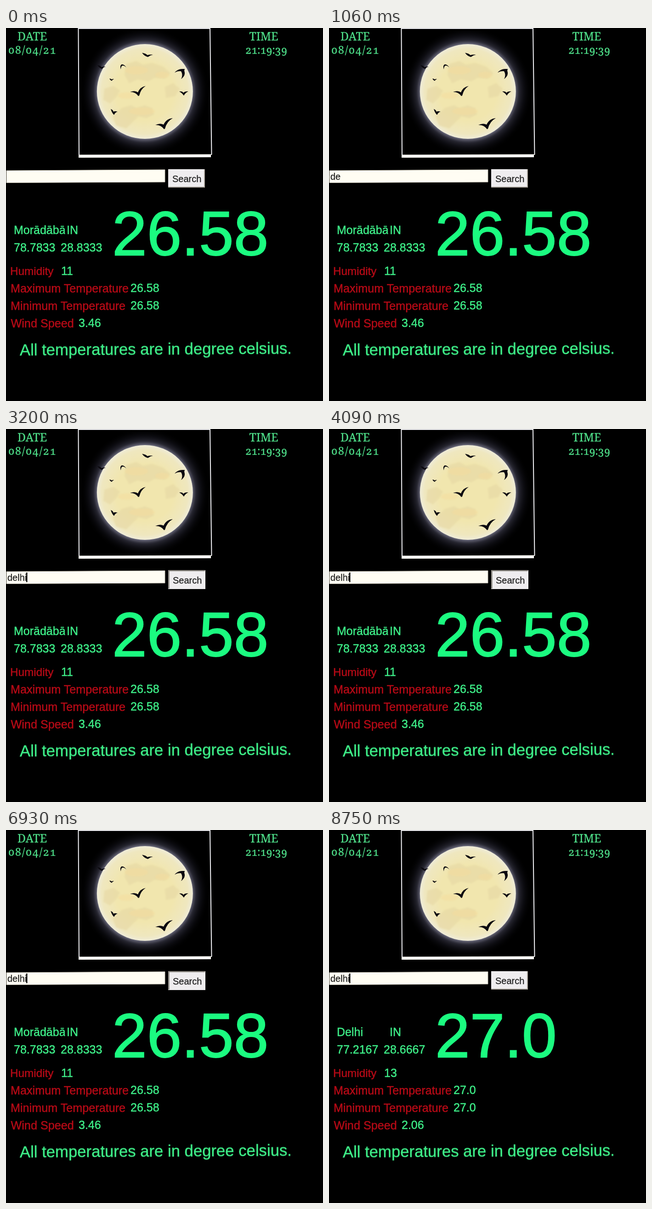
Write an HTML page that moves like this. It is 690 px wide and 811 px high and loops after 8920 ms.

```html
<!DOCTYPE html>
<html lang="en">
<head>
<meta charset="utf-8">
<title>Weather</title>
<style>
html, body { margin: 0; width: 100%; height: 100%; overflow: hidden; background: #000; }
svg { display: block; width: 690px; height: 811px; }
text { font-family: "Liberation Sans", Arial, sans-serif; white-space: pre; }
.serif text { font: 500 23px "Noto Serif", Georgia, serif; font-variant-numeric: oldstyle-nums; fill: #4fe08a; stroke: #4fe08a; stroke-width: .3px; }
.serif .head { font-size: 24.8px; }
.info { font-size: 25px; fill: #3eee88; stroke: #3eee88; stroke-width: .5px; }
.label { font-size: 25.2px; fill: #b50a16; stroke: #b50a16; }
.big { font-size: 136px; fill: #1bfb80; stroke: #1bfb80; stroke-width: 2px; }
.note { font-size: 34.7px; }
.field { font-size: 20px; fill: #222; stroke: #222; stroke-width: .3px; }

.before, .after, .up, .down, .typing, .caret { animation: 8.92s step-end infinite; }
.before { animation-name: before; }
.after { animation-name: after; }
.up { animation-name: up; }
.down { animation-name: down; }
.typing { animation-name: typing; }
.caret { animation-name: blink; }

@keyframes before { 0% { visibility: visible } 87.67%, 100% { visibility: hidden } }
@keyframes after { 0% { visibility: hidden } 87.67%, 100% { visibility: visible } }
@keyframes up { 0%, 87.67% { visibility: visible } 34.75% { visibility: hidden } 100% { visibility: visible } }
@keyframes down { 0%, 87.67% { visibility: hidden } 34.75% { visibility: visible } 100% { visibility: hidden } }
@keyframes typing {
  0% { transform: translateX(0) }
  7% { transform: translateX(11px) }
  10% { transform: translateX(22px) }
  13% { transform: translateX(27px) }
  15.5% { transform: translateX(38px) }
  18.5%, 100% { transform: translateX(42px) }
}
@keyframes blink {
  0%, 10.09%, 20.18%, 30.27% { visibility: hidden }
  3.36%, 13.45%, 23.54%, 33.63%, 100% { visibility: visible }
}
</style>
</head>
<body>
<svg viewBox="0 0 690 811">
  <defs>
    <radialGradient id="glow">
      <stop offset=".74" stop-color="#a9a8c4" stop-opacity=".6"/>
      <stop offset=".8" stop-color="#6c6b88" stop-opacity=".34"/>
      <stop offset=".88" stop-color="#3a3950" stop-opacity=".2"/>
      <stop offset="1" stop-color="#000" stop-opacity="0"/>
    </radialGradient>
    <radialGradient id="moon">
      <stop offset=".6" stop-color="#f1e6ae"/>
      <stop offset=".9" stop-color="#efe7bf"/>
      <stop offset="1" stop-color="#efecd8"/>
    </radialGradient>
    <filter id="soft"><feGaussianBlur stdDeviation="1.5"/></filter>
    <clipPath id="city"><path d="M0 415H128.5V460H0z"/></clipPath>
    <clipPath id="frame"><path d="M158 1H444L447 276H159z"/></clipPath>
  </defs>

  <g class="serif">
    <text class="head" x="25" y="27">DATE</text>
    <text x="5" y="56" letter-spacing="1.5">08/04/21</text>
    <text class="head" x="529.5" y="27">TIME</text>
    <text x="521" y="56" letter-spacing="-.3">21:19:39</text>
  </g>

  <g clip-path="url(#frame)">
    <circle cx="302" cy="138" r="140" fill="url(#glow)"/>
    <ellipse cx="302.3" cy="138" rx="104.5" ry="103" fill="url(#moon)"/>
    <g filter="url(#soft)" fill="#e6d8a4" opacity=".6">
      <path d="M262 78l22-6 14 8 20-4 24 8 16 14-12 12-22-2-14 8-24-4-18 8-10-18z"/>
      <path d="M252 174l20-6 12 6 18-6 16 6 4 14-16 8-18-4-12 12-14 14-22-6-8-20z"/>
      <path d="M214 132l20-6 14 10-8 14-14 14-14-8z"/>
      <path d="M346 128l18-8 14 12-10 16-20 4z"/>
    </g>
    <g filter="url(#soft)" fill="#f6dc9c" opacity=".45">
      <ellipse cx="284" cy="92" rx="25" ry="9"/>
      <ellipse cx="296" cy="181" rx="28" ry="8"/>
      <ellipse cx="262" cy="147" rx="18" ry="7"/>
      <ellipse cx="340" cy="102" rx="15" ry="7"/>
    </g>
    <g fill="#0c0a10">
      <path d="M296 54q8 1 12 5q5-2 12-1q-6 1-11 5q-7-1-13-9z"/>
      <path d="M199 81q6 0 9 4q4-2 9-1q-5 1-8 5q-6-2-10-8z"/>
      <path d="M250 90q-3-8 2-11q6 0 10 7q-5-5-9-4q-3 2-3 8z"/>
      <path d="M225 110q4 0 5 2q2-2 5-1q-3 1-5 4q-3-1-5-5z"/>
      <path d="M367 97q7-8 16-8l6 0l-1 4q4 10-7 18q5-9 0-17q-7-1-14 3z"/>
      <path d="M270 139q11-4 17 1q5-12 17-14q-11 7-14 21l-2 1q-6-9-18-9z"/>
      <path d="M377 138q7-1 9 3q4-4 11-3q-6 2-10 9q-4-6-10-9z"/>
      <path d="M228 176q5 2 6 6q3-2 9 0q-5 1-8 7q-5-5-7-13z"/>
      <path d="M325 211q10-5 18-1q6-13 20-14q-13 7-17 23l-2 1q-7-10-19-9z"/>
    </g>
  </g>
  <path d="M159 278L157.5 1H444L447.5 275" fill="none" stroke="#f4f4f8" stroke-width="2"/>
  <path d="M158 275.5L448 274.5V276L446 276V281L158 282z" fill="#fffef8"/>

  <path d="M1 310L346 308V335L1 336.5z" fill="#fffdf3" stroke="#b9b5a8"/>
  <text class="field" x="3" y="330">delhi</text>
  <g class="typing">
    <path d="M3 312H48V334H3z" fill="#fffdf3"/>
    <path class="caret" d="M2 312H4.5V333H2z" fill="#111"/>
  </g>

  <g class="up">
    <path d="M353 307H433V347H353z" fill="#efedef"/>
    <path d="M353 346H432V307" fill="none" stroke="#aaa49c" stroke-width="2"/>
    <text class="field" x="362" y="335">Search</text>
  </g>
  <g class="down">
    <path d="M353 307H434V348H353z" fill="#efedef"/>
    <path d="M354.5 347V308H433" fill="none" stroke="#8d8982" stroke-width="2.5"/>
    <text class="field" x="363" y="336">Search</text>
  </g>

  <g class="info">
    <text x="132" y="448">IN</text>
    <g class="label">
      <text x="9" y="537" font-size="24.3">Humidity</text>
      <text x="10" y="575">Maximum Temperature</text>
      <text x="10" y="613">Minimum Temperature</text>
      <text x="10.5" y="651">Wind Speed</text>
    </g>
    <g class="before">
      <text x="17" y="448" clip-path="url(#city)">Morādābād</text>
      <text x="17" y="486">78.7833</text>
      <text x="119" y="486">28.8333</text>
      <text class="big" x="231" y="493.5">26.58</text>
      <text x="120" y="537">11</text>
      <text x="271" y="574">26.58</text>
      <text x="271" y="612">26.58</text>
      <text x="158" y="650">3.46</text>
    </g>
    <g class="after">
      <text x="17" y="448">Delhi</text>
      <text x="17" y="486">77.2167</text>
      <text x="119" y="486">28.6667</text>
      <text class="big" x="231" y="493.5">27.0</text>
      <text x="120" y="537">13</text>
      <text x="271" y="574">27.0</text>
      <text x="271" y="612">27.0</text>
      <text x="158" y="650">2.06</text>
    </g>
    <text class="note" x="30" y="712" transform="rotate(-.35 30 712)">All temperatures are in degree celsius.</text>
  </g>
</svg>
</body>
</html>
```
